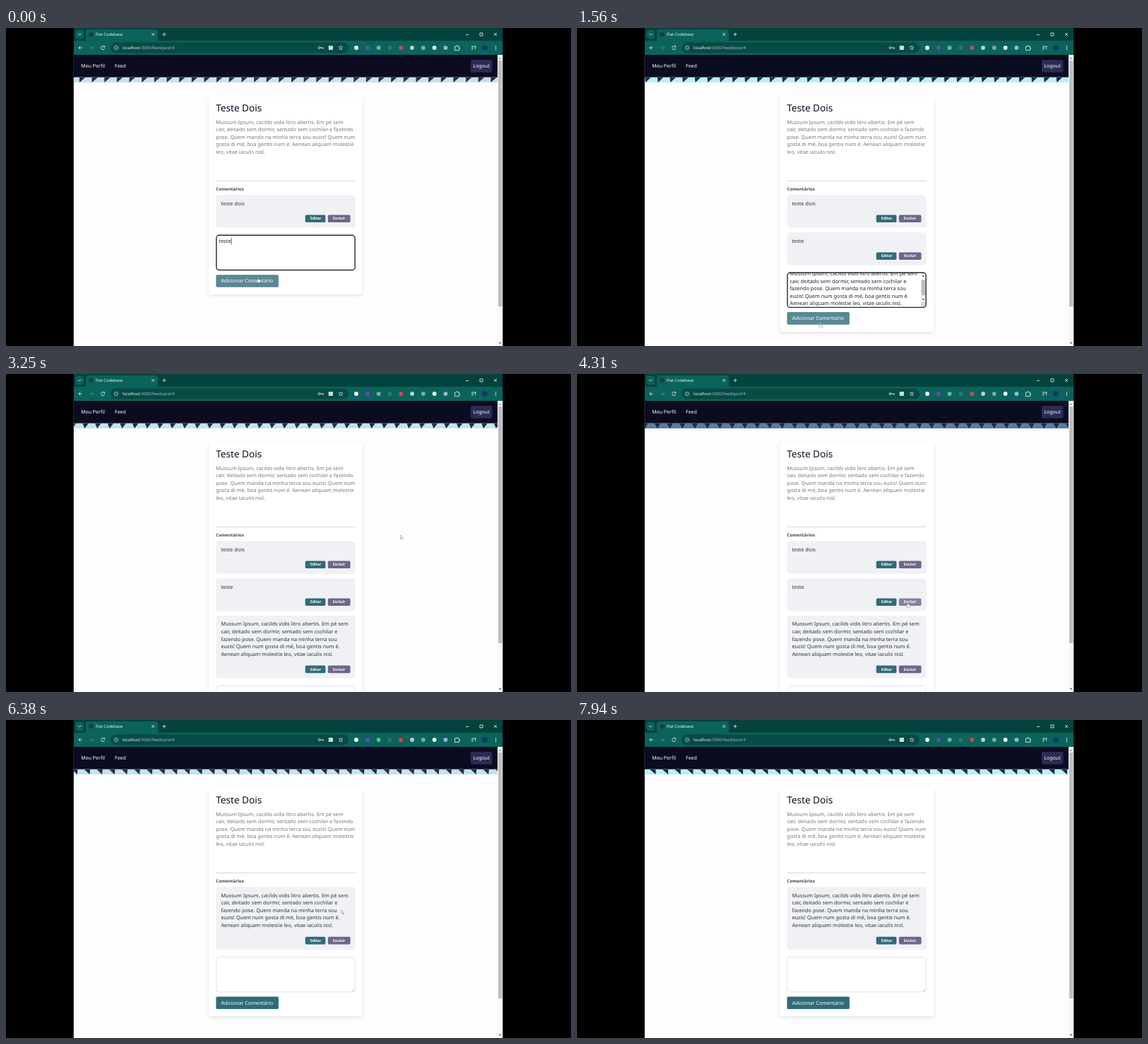
Animation, 800 px wide and 450 px high, one loop 8 s. Source, as an HTML page with a canvas:

```html
<!DOCTYPE html>
<html lang="pt">
<head>
<meta charset="utf-8">
<title>Feed</title>
<style>
  html, body { margin: 0; width: 100%; height: 100%; overflow: hidden; background: #000; }
  canvas { display: block; }
</style>
</head>
<body>
<canvas id="stage" width="800" height="450"></canvas>
<script>
const ctx = document.getElementById('stage').getContext('2d');
const LOOP = 8000;
const LEFT = 95.6, RIGHT = 703.4, PAGE_RIGHT = 696;
const COLUMN = 297.3, COLUMN_WIDTH = 197.4;
const LINE = 10.57;
const TILE = 17.65;
const TEAL = '#316b79', PURPLE = '#6d658c', WHITE = '#f0f6f5';
const PAGE_FONT = '"Noto Sans", sans-serif';
const BROWSER_FONT = '"Open Sans", sans-serif';

const POST = [
  'Mussum Ipsum, cacilds vidis litro abertis. Em pé sem',
  'cair, deitado sem dormir, sentado sem cochilar e fazendo',
  'pose. Quem manda na minha terra sou euzis! Quem num',
  'gosta di mé, boa gentis num é. Aenean aliquam molestie',
  'leo, vitae iaculis nisl.'
];
const LONG = [
  'Mussum Ipsum, cacilds vidis litro abertis. Em pé sem',
  'cair, deitado sem dormir, sentado sem cochilar e',
  'fazendo pose. Quem manda na minha terra sou',
  'euzis! Quem num gosta di mé, boa gentis num é.',
  'Aenean aliquam molestie leo, vitae iaculis nisl.'
];

const TIMES = { click: 300, addFirst: 430, focus: 930, paste: 1180, addLong: 2620, remove: 6060 };

// Pointer stops; it rests at each one before easing to the next
const STOPS = [
  { at: 0, x: 357, y: 353 },
  { at: 950, x: 362, y: 372 },
  { at: 1560, x: 344.5, y: 417 },
  { at: 3250, x: 558.5, y: 228 },
  { at: 3900, x: 470, y: 414 },
  { at: 4310, x: 468, y: 323 },
  { at: 4910, x: 472, y: 369 },
  { at: 5200, x: 475, y: 269 },
  { at: 6380, x: 475, y: 269 },
  { at: 7700, x: 712, y: 110 }
];
const REST = .6;

const mix = (a, b, f) => a + (b - a) * f;
const smooth = f => f * f * (3 - 2 * f);
const clamp = f => Math.max(0, Math.min(1, f));

function pointerAt(t) {
  const next = STOPS.findIndex(stop => stop.at > t);
  if (next < 0) return STOPS[STOPS.length - 1];
  const a = STOPS[next - 1], b = STOPS[next];
  const f = smooth(clamp(((t - a.at) / (b.at - a.at) - REST) / (1 - REST)));
  return { x: mix(a.x, b.x, f), y: mix(a.y, b.y, f) };
}

function box(x, y, w, h, color, r = 0) {
  ctx.fillStyle = color;
  ctx.beginPath();
  ctx.roundRect(x, y, w, h, r);
  ctx.fill();
}

function frame(x, y, w, h, color, r, width) {
  ctx.strokeStyle = color;
  ctx.lineWidth = width;
  ctx.beginPath();
  ctx.roundRect(x, y, w, h, r);
  ctx.stroke();
}

function disc(x, y, r, color) {
  box(x - r, y - r, 2 * r, 2 * r, color, r);
}

// Strokes an SVG path placed at x, y
function icon(x, y, d, color = WHITE, width = .8) {
  ctx.save();
  ctx.translate(x, y);
  ctx.strokeStyle = color;
  ctx.lineWidth = width;
  ctx.stroke(new Path2D(d));
  ctx.restore();
}

function triangle(x, y, dy, color) {
  ctx.fillStyle = color;
  ctx.fill(new Path2D(`M${x - 1.8} ${y}h3.6l-1.8 ${dy}z`));
}

// y is the middle of the letters
function text(str, x, y, size, color, weight = 400, family = PAGE_FONT) {
  ctx.font = `${weight} ${size}px ${family}`;
  ctx.fillStyle = color;
  ctx.fillText(str, x, y + size * .32);
  return x + ctx.measureText(str).width;
}

function lines(list, x, y, color) {
  list.forEach((line, i) => text(line, x, y + i * LINE, 7.32, color));
}

function drawBrowser(loading) {
  const bar = '#0b635b', cross = 'M-2-2L2 2M2-2L-2 2';
  box(LEFT, 0, RIGHT - LEFT, 18, '#04433d');
  box(LEFT, 18, RIGHT - LEFT, 20, bar);
  box(98.5, 3, 11.5, 12, bar, 3);
  icon(104.3, 9, 'M-2-1L0 1L2-1');
  box(113, 2, 102, 18, bar, 4);
  disc(120.5, 9, 3.3, '#24373b');
  text('Flat Codebase', 127, 9.3, 5.8, '#fff', 400, BROWSER_FONT);
  icon(208.3, 9, cross);
  icon(224, 9, 'M-2.5 0h5M0-2.5v5');
  icon(653, 9.5, 'M-2 0h4');
  icon(673, 9, 'M-2-2h4v4h-4z');
  icon(693, 9, cross);

  const arrow = 'M2.5 0h-5l2.4-2.4M-2.5 0l2.4 2.4';
  icon(105.3, 28, arrow);
  ctx.save();
  ctx.scale(-1, 1);
  icon(-121, 28, arrow, '#569087');
  ctx.restore();
  icon(137.3, 28, loading ? cross : 'M2-1.6a2.6 2.6 0 1 0 .4 2.4M2.4-3v2h-2');

  box(148, 20.5, 337, 15, '#084a44', 7.5);
  disc(156, 28, 4.8, '#0b5a52');
  frame(153.7, 25.7, 4.6, 4.6, WHITE, 2.3, .6);
  const end = text('localhost', 165, 28, 5.9, '#fff', 400, BROWSER_FONT);
  text(':3000/feed/post/4', end, 28, 5.9, '#a9cbc7', 400, BROWSER_FONT);
  frame(442, 26.5, 3, 3, WHITE, 1.5, .8);
  icon(445, 28, 'M0 0h4.5v1.6M2.8 0v1.2');
  box(456.7, 25, 6.3, 6, '#c5dcd9', 1);
  icon(474, 28, 'M0-3l.9 2h2l-1.6 1.4.6 2.3L0 1.5l-1.9 1.2.6-2.3L-2.9-1h2z', WHITE, .6);

  const extensions = ['#fff', '#6d45b8', '#6db59e', '#34746d', '#d64450', '#b9d3cf', '#79aba5', '#f3f3f0', '#8fb9dd'];
  extensions.forEach((color, i) => disc(496 + i * 15.8, 28, 2.9, color));
  icon(638.5, 28, 'M-3-2h2v-1h2v1h2v2h1v1.500h-1v2h-6z');
  icon(662, 28, 'M-3-2h5M-3 0h3M-3 2h2.5M2.5 2v-4h1.500');
  disc(678, 28, 4, '#123a6b');
  for (let dot = -1; dot <= 1; dot++) disc(693.5, 28 + dot * 2.3, .7, '#fff');
}

// Sliding row of dark triangles whose tips swing from left to right over the loop
function drawRibbon(t) {
  const top = 69.7, height = 7.4;
  const dusk = Math.exp(-(((t - 4310) / 250) ** 2));
  const shine = .5 - .5 * Math.cos(t * 2 * Math.PI / 3200);
  const tint = (from, to, f) => from.map((c, i) => mix(c, to[i], f));
  const rgb = c => `rgb(${c.map(Math.round)})`;
  const ground = tint(tint([196, 228, 233], [184, 240, 250], shine), [92, 124, 156], dusk);
  const tip = 12.2 - 4.3 * Math.cos(Math.PI * t / LOOP);

  ctx.save();
  ctx.beginPath();
  ctx.rect(LEFT, top, PAGE_RIGHT - LEFT, height);
  ctx.clip();
  box(LEFT, top, PAGE_RIGHT - LEFT, height, rgb(ground));
  ctx.fillStyle = rgb(tint([42, 41, 82], [27, 42, 76], shine));
  const drift = t / 1000 % 1 * TILE;
  for (let x = 96 - 2 * TILE + drift; x < PAGE_RIGHT; x += TILE) {
    ctx.beginPath();
    ctx.moveTo(x + 8, top);
    ctx.lineTo(x + 16.5, top);
    ctx.lineTo(x + tip, top + height);
    ctx.fill();
  }
  ctx.restore();
}

function drawNav() {
  box(LEFT, 38, PAGE_RIGHT - LEFT, 31.7, '#0b0c20');
  box(658, 45, 30.5, 17.7, '#2b2b53', 2);
  text('Meu Perfil', 106.3, 54, 7.04, '#fff', 500);
  text('Feed', 154, 54, 7.04, '#fff', 500);
  text('Logout', 661.3, 54, 7.04, '#fff', 500);
}

function drawScrollbar(bottom) {
  box(PAGE_RIGHT, 38, RIGHT - PAGE_RIGHT, 412, '#f8f8f9');
  box(697, 46, 5.5, bottom - 46, '#bfbfc1');
  triangle(699.6, 43.7, -2.2, '#8a8a8a');
  triangle(699.6, 444.8, 2.2, '#505050');
}

// Returns whether the pointer rests on the button
function button(label, x, y, w, h, color, pointer, size, weight) {
  const over = pointer.x >= x && pointer.x <= x + w && pointer.y >= y && pointer.y <= y + h;
  ctx.globalAlpha = over ? .8 : 1;
  box(x, y, w, h, color, 1.7);
  ctx.globalAlpha = 1;
  text(label, x + 7, y + h / 2, size, '#fff', weight);
  return over;
}

const commentHeight = body => 46.2 + (body.length - 1) * LINE;

function drawComment(body, y, pointer) {
  const height = commentHeight(body), top = y + height - 18;
  box(COLUMN, y, COLUMN_WIDTH, height, '#eff1f4', 4);
  lines(body, 304.4, y + 12, '#30343c');
  const overEdit = button('Editar', 423.7, top, 28.7, 10.6, TEAL, pointer, 5.28, 600);
  const overDelete = button('Excluir', 455.8, top, 31.7, 10.6, PURPLE, pointer, 5.28, 600);
  return overEdit || overDelete;
}

function drawTextarea(y, content, focused, t) {
  const scrolled = content.length > 1;
  ctx.save();
  ctx.beginPath();
  ctx.rect(COLUMN, y, COLUMN_WIDTH, 49.8);
  ctx.clip();
  lines(content, 301.3, y + (scrolled ? 2 : 9), '#20242c');
  if (scrolled) {
    box(487, y, 7, 50, '#f7f7f8');
    box(487.5, y + 11, 5.5, 21.5, '#bdbdbf');
    triangle(490.3, y + 6, -2.2, '#555');
    triangle(490.3, y + 37.5, 2.2, '#555');
    box(487, y + 41.5, 7, 8, '#dcdcde');
  } else if (focused && t % 1000 < 500) {
    const width = content.length ? ctx.measureText(content[0]).width : 0;
    box(301.7 + width, y + 4, .7, 9.5, '#111');
  }
  ctx.restore();
  frame(297.9, y + .4, 196.2, 49.2, focused ? '#1d2a35' : '#d6d8de', 4, focused ? 1.4 : .7);
  if (!focused) icon(493, y + 48.5, 'M-3 0l3-3M-1.3 0L0-1.3', '#888', .5);
}

function drawPointer({ x, y }, kind) {
  const outlines = {
    hand: 'M-.6.5q.6-1 1.2 0v2.3l2.4.7q.6.3.4 1.2l-.6 2.6h-3l-2-2.6q0-.9.9-.5l.7.6z',
    arrow: 'M0 0v5.4l1.3-1.2.9 1.9.8-.4-.9-1.8h1.7z',
    text: 'M-1 0h2M0 0v6M-1 6h2'
  };
  ctx.save();
  ctx.translate(x, y);
  ctx.fillStyle = '#fff';
  ctx.fill(new Path2D(outlines[kind]));
  ctx.restore();
  icon(x, y, outlines[kind], '#666', .45);
}

function commentsAt(t) {
  if (t >= TIMES.remove) return [LONG];
  const comments = [['teste dois']];
  if (t >= TIMES.addFirst) comments.push(['teste']);
  if (t >= TIMES.addLong) comments.push(LONG);
  return comments;
}

function draw(t) {
  ctx.textRendering = 'geometricPrecision';
  box(0, 0, 800, 450, '#000');
  ctx.save();
  ctx.beginPath();
  ctx.rect(LEFT, 0, RIGHT - LEFT, 450);
  ctx.clip();
  box(LEFT, 38, RIGHT - LEFT, 412, '#fdfdfe');

  const pointer = pointerAt(t);
  const comments = commentsAt(t);
  const content = t < TIMES.addFirst ? ['teste']
    : t >= TIMES.paste && t < TIMES.addLong ? LONG : [];
  const focused = t < TIMES.click || (t >= TIMES.focus && t < TIMES.addLong);

  const areaTop = comments.reduce((y, body) => y + commentHeight(body) + 6.7, 240);
  const buttonTop = areaTop + 56.3;

  ctx.shadowColor = 'rgba(0,0,0,.11)';
  ctx.shadowBlur = 4;
  ctx.shadowOffsetY = 1.8;
  box(287.2, 97, 218, buttonTop + 28 - 97, '#fff', 4);
  ctx.shadowColor = 'transparent';

  text('Teste Dois', 297.2, 113.5, 13.6, '#0c1020', 500);
  lines(POST, 297.2, 133.2, '#747983');
  box(COLUMN, 215.8, COLUMN_WIDTH, .9, '#d3d5da');
  text('Comentários', COLUMN, 228.2, 6.16, '#41454e', 600);

  let y = 236.3, hovering = false;
  for (const body of comments) {
    hovering = drawComment(body, y, pointer) || hovering;
    y += commentHeight(body) + 6.7;
  }
  drawTextarea(areaTop, content, focused, t);
  hovering = button('Adicionar Comentário', 297.4, buttonTop, 88.5, 17.6, TEAL, pointer, 7.2, 500) || hovering;

  drawNav();
  drawRibbon(t);
  drawScrollbar(comments.length === 3 ? 381 : 394);
  drawBrowser([TIMES.addFirst, TIMES.remove].some(end => t >= end - 120 && t < end));

  const inArea = pointer.x > COLUMN && pointer.x < 487 && pointer.y > areaTop && pointer.y < areaTop + 50;
  drawPointer(pointer, hovering ? 'hand' : inArea ? 'text' : 'arrow');
  ctx.restore();
}

const start = performance.now();
function tick() {
  draw((performance.now() - start) % LOOP);
  requestAnimationFrame(tick);
}
tick();
</script>
</body>
</html>
```
